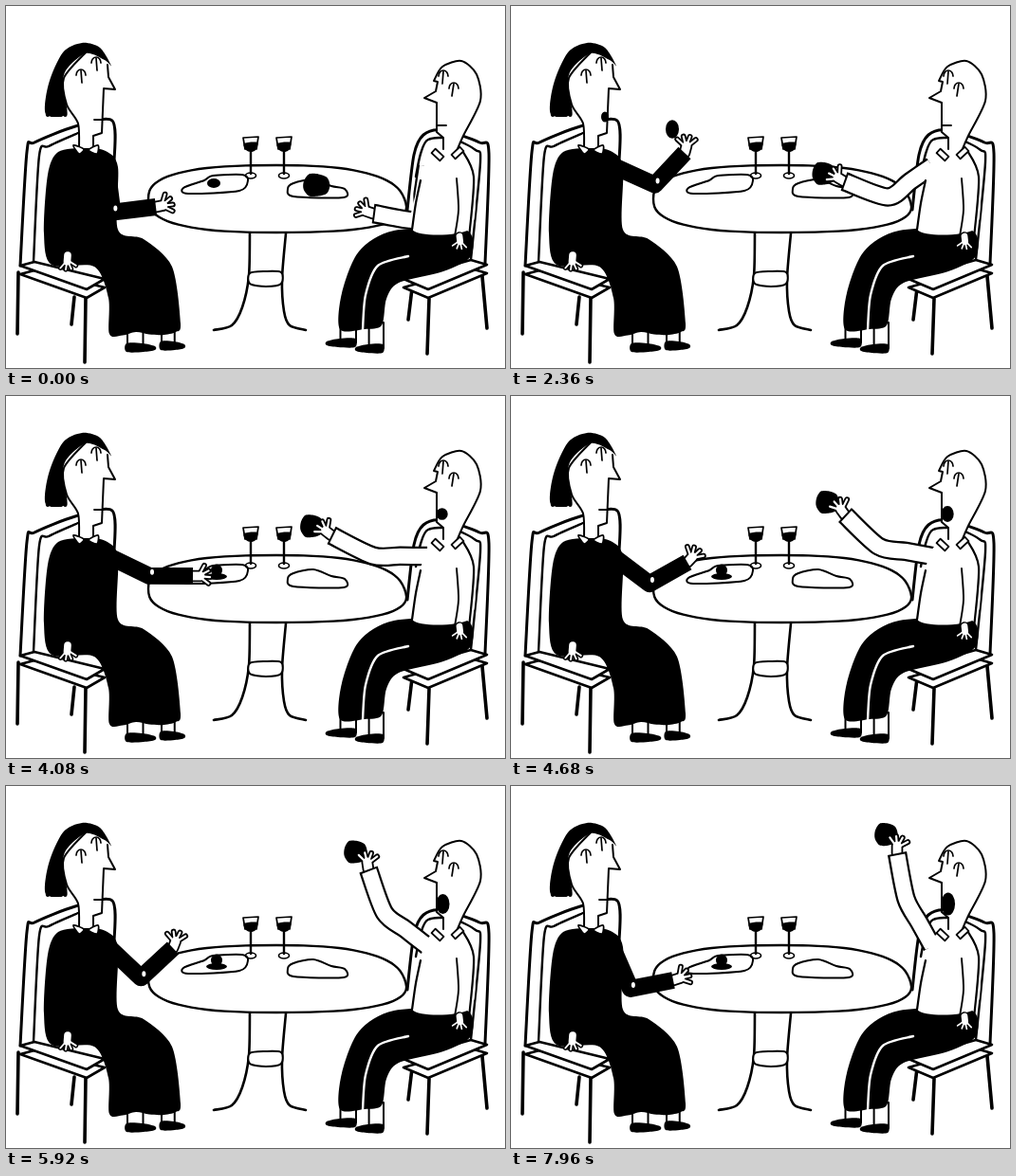
These frames come from a looping animation (526x382 px, 8000 ms). An HTML page with a canvas:

```html
<!DOCTYPE html>
<html lang="en">
<head>
<meta charset="utf-8">
<title>Dinner for two</title>
<style>
  html, body { margin: 0; width: 100%; height: 100%; overflow: hidden; background: #fff; }
  canvas { display: block; }
</style>
</head>
<body>
<canvas id="stage" width="526" height="382"></canvas>
<script>
const ctx = document.getElementById('stage').getContext('2d');
const LOOP = 8000, STEP = 40;
const INK = '#000', PAPER = '#fff';

// ---- drawing helpers ----
const range = (n, f) => Array.from({ length: n }, (_, i) => f(i));

function ink(width = 2.2, color = INK) {
  ctx.lineWidth = width;
  ctx.strokeStyle = color;
  ctx.stroke();
}

function fill(color = INK) {
  ctx.fillStyle = color;
  ctx.fill();
}

// Smooth curve through a flat list x, y, x, y, ...
function curve(p, closed) {
  const n = p.length / 2;
  const at = i => {
    const k = closed ? (i + n) % n : Math.max(0, Math.min(n - 1, i));
    return [p[2 * k], p[2 * k + 1]];
  };
  ctx.beginPath();
  ctx.moveTo(p[0], p[1]);
  for (let i = 0; i < (closed ? n : n - 1); i++) {
    const [a, b, c, d] = [at(i - 1), at(i), at(i + 1), at(i + 2)];
    ctx.bezierCurveTo(
      b[0] + (c[0] - a[0]) / 7, b[1] + (c[1] - a[1]) / 7,
      c[0] - (d[0] - b[0]) / 7, c[1] - (d[1] - b[1]) / 7, c[0], c[1]);
  }
  if (closed) ctx.closePath();
}

function corners(p) {
  for (let i = 0; i < p.length; i += 2) ctx.lineTo(p[i], p[i + 1]);
}

function edge(p, width, color) {
  ctx.beginPath();
  corners(p);
  ink(width, color);
}

const line = (p, width) => { curve(p); ink(width); };
const blob = (p, color) => { curve(p, true); fill(color); };
const shape = (p, width) => { blob(p, PAPER); ink(width); };

function oval(x, y, rx, ry, color = INK) {
  ctx.beginPath();
  ctx.ellipse(x, y, rx, ry, 0, 0, 7);
  fill(color);
}

function place(x, y, angle, paint) {
  ctx.save();
  ctx.translate(x, y);
  ctx.rotate(angle);
  paint();
  ctx.restore();
}

// ---- motion helpers ----
const mix = (a, b, u) => a + (b - a) * u;
const ramp = (t, from, to) => Math.max(0, Math.min(1, (t - from) / (to - from)));

// Linear interpolation over rows of [time, ...values]
function pose(keys, t) {
  let i = 0;
  while (i < keys.length - 2 && t >= keys[i + 1][0]) i++;
  const a = keys[i], b = keys[i + 1], u = ramp(t, a[0], b[0]);
  return a.slice(1).map((v, k) => mix(v, b[k + 1], u));
}

// Two bones from shoulder to wrist; side picks the bend of the elbow
function reach(arm, t) {
  const [x, y] = pose(arm.wrist, t);
  const [sx, sy] = arm.shoulder;
  const { upper, fore, side } = arm;
  const d = Math.min(Math.hypot(x - sx, y - sy), upper + fore);
  const bend = Math.acos(Math.min(1, (upper ** 2 + d ** 2 - fore ** 2) / (2 * upper * d)));
  const a = Math.atan2(y - sy, x - sx) + side * bend;
  const ex = sx + upper * Math.cos(a), ey = sy + upper * Math.sin(a);
  return { sx, sy, ex, ey, x, y, angle: Math.atan2(y - ey, x - ex) };
}

const her = {
  shoulder: [106, 168], upper: 50, fore: 46, side: 1,
  wrist: [[0, 158, 212], [1160, 185, 194], [2360, 183, 155], [3150, 181, 152],
    [4080, 197, 190], [5280, 175, 161], [6560, 177, 181], [7960, 171, 205]]
};
const his = {
  shoulder: [444, 169], upper: 57, fore: 49, side: -1,
  wrist: [[0, 387, 219], [1160, 365, 206], [2360, 351, 185], [4080, 343, 147],
    [5280, 361, 104], [6560, 403, 72], [7960, 407, 71]]
};
const herBite = [[560, 219, 187], [1160, 155, 187], [2360, 170, 130],
  [3150, 168, 127], [4000, 218, 184]];

// ---- parts ----
// Palm and fanned fingers, pointing along +x
function hand(x, y, angle, flip = 1, size = 1) {
  place(x, y, angle, () => {
    ctx.scale(size, size * flip);
    for (const [grow, color] of [[3.6, INK], [0, PAPER]]) {
      edge([0, 0, 8, 0], 9 + grow, color);
      [-1.05, -.5, 0, .5].forEach((a, i) =>
        edge([6, 0, 6 + 12 * Math.cos(a), 13 * Math.sin(a) + i * .5], 2.2 + grow, color));
    }
  });
}

function eye(x, y, lean) {
  ctx.beginPath();
  ctx.ellipse(x, y + 6, 5, 6, 0, Math.PI, 0);
  ink(1.7);
  edge([x, y + 1, x + lean, y + 14], 1.7);
}

// A soft back of the head joined to a sharp profile
function head(back, profile) {
  curve(back);
  corners(profile);
  fill(PAPER);
  ink(2);
}

function tab(x, y, angle) {
  place(x, y, angle, () => {
    ctx.beginPath();
    ctx.rect(-6, -3, 12, 6);
    fill(PAPER);
    ink(1.8);
  });
}

function foot(heel, toe, y, top) {
  const ankle = mix(heel, toe, .55);
  ctx.beginPath();
  ctx.rect(Math.min(heel, ankle) + 1, top, Math.abs(ankle - heel), y - 5 - top);
  fill(PAPER);
  ink(2);
  blob([heel, y - 9, ankle, y - 9, toe, y - 6, toe, y - 2, mix(heel, toe, .6), y, heel, y]);
}

function chair(back, inner, seat, legs) {
  line(back, 3);
  line(inner, 2.4);
  for (const leg of legs) edge(leg, 3.6);
  for (const drop of [9, 0]) {
    ctx.beginPath();
    corners(seat.map((v, i) => i % 2 ? v + drop : v));
    ctx.closePath();
    fill(PAPER);
    ink(2.6);
  }
}

const leftChair = () => chair(
  [15, 274, 22, 154, 30, 144, 73, 127, 112, 121, 114, 165],
  [29, 270, 35, 158, 45, 148, 76, 134],
  [15, 274, 30, 270, 104, 288, 85, 299],
  [[13, 281, 12, 346], [72, 307, 69, 336], [84, 308, 83, 376]]);

const rightChair = () => chair(
  [423, 215, 430, 157, 440, 136, 460, 131, 499, 144, 509, 155, 505, 272],
  [432, 180, 437, 156, 445, 141, 470, 140, 495, 152, 500, 165, 490, 268],
  [419, 288, 490, 268, 507, 273, 445, 299],
  [[428, 298, 424, 331], [446, 309, 444, 367], [502, 285, 507, 340]]);

function woman(t) {
  head([84, 49, 61, 76, 64, 104, 76, 124, 77, 152],
    [92, 152, 92, 137, 101, 134, 103, 87, 115, 88, 108, 75, 107, 62]);
  blob([42, 114, 45, 82, 60, 49, 80, 39, 99, 44, 111, 63, 104, 57, 84, 50,
    63, 68, 60, 88, 64, 114]);
  range(5, i => oval(44 + i * 4.6, 114, 2.2, 3));
  eye(79, 67, 1);
  eye(95, 54, 1);
  const open = ramp(t, 1500, 1900) - ramp(t, 3100, 3400);
  if (open > .1) oval(99, 117, 4 * open, 5.5 * open);
  else edge([93, 120, 102, 120], 1.8);

  foot(127, 157, 365, 340);
  foot(163, 188, 363, 340);
  const hem = range(6, i => [109 + i * 14, 346 + 2 * Math.sin(i * 2.2)]).flat();
  blob([84, 150, 55, 154, 44, 178, 40, 240, 48, 273, 93, 275, 108, 308, ...hem,
    184, 335, 175, 275, 145, 246, 118, 236, 118, 170, 105, 153]);
  shape([71, 147, 82, 151, 77, 156], 1.8);
  shape([87, 152, 97, 147, 96, 156], 1.8);
  hand(65, 263, 1.65, 1, .85);
}

function manLegs() {
  foot(368, 338, 360, 338);
  foot(397, 369, 366, 334);
  blob([352, 341, 354, 303, 372, 259, 409, 237, 484, 236, 490, 264, 461, 280,
    414, 292, 401, 309, 396, 337, 378, 341]);
  curve([376, 342, 379, 305, 392, 274, 424, 264]);
  ink(2.4, PAPER);
}

function manBody() {
  blob([447, 158, 438, 178, 428, 236, 488, 236, 494, 190, 486, 158, 468, 148], PAPER);
  line([437, 184, 432, 208, 428, 236]);
  line([480, 151, 493, 180, 488, 245]);
  line([475, 182, 477, 215, 473, 243], 1.9);
  hand(478, 243, 1.45, -1, .75);
}

function manHead(t) {
  head([475, 153, 482, 137, 500, 100, 496, 72, 480, 58, 460, 64, 451, 79],
    [455, 80, 453, 90, 441, 97, 454, 102, 454, 133, 461, 139, 461, 151]);
  edge([464, 153, 473, 153], 4, PAPER);
  eye(461, 68, -1);
  eye(472, 81, -2);
  const open = mix(.4, 1, ramp(t, 3450, 5280)) + .15 * ramp(t, 6600, 7400);
  if (t > 3450) oval(454.5 + 6 * open ** .3, 124.5, 7 * open ** .3, 10.5 * open);
  else edge([455, 126, 464, 126], 1.8);
  tab(455, 157, .75);
  tab(476, 155, -.75);
}

function glass(x) {
  ctx.beginPath();
  corners([x - 8, 139, x - 6, 151, x + 6, 151, x + 8, 138]);
  ctx.closePath();
  fill(PAPER);
  ink(1.7);
  blob([x - 7, 145, x + 7, 144, x + 5, 152, x, 154, x - 5, 152]);
  edge([x, 153, x, 177], 2.4);
  ctx.beginPath();
  ctx.ellipse(x, 179, 5.5, 3, 0, 0, 7);
  ink(1.7);
}

function table() {
  line([257, 239, 256, 285, 249, 318, 238, 337, 219, 342], 2.6);
  line([295, 240, 291, 288, 293, 322, 299, 337, 316, 342], 2.6);
  shape([257, 282, 273, 280, 290, 281, 290, 293, 274, 296, 257, 293], 2);
  // Superellipse whose right end leans outwards at the bottom
  const soft = v => Math.sign(v) * Math.abs(v) ** .77;
  shape(range(40, i => {
    const a = i * Math.PI / 20, c = soft(Math.cos(a)), y = 35.5 * soft(Math.sin(a));
    return [285 + 135 * c + .4 * y * Math.max(0, c), 203.5 + y];
  }).flat(), 2.4);
  shape([187, 192, 209, 184, 218, 179, 249, 178, 255, 184, 246, 195, 192, 198], 2);
  shape([297, 193, 303, 187, 324, 183, 343, 190, 357, 193, 356, 202, 303, 201], 2);
  glass(258);
  glass(293);
}

function herFood(t) {
  const [x, y] = pose(herBite, t);
  if (t < 4000) return oval(x, y, 7, 5 + (187 - y) / 12);
  oval(222, 184, 6, 6.5);
  oval(222, 190.5, 11, 3.5);
}

function herReach(t) {
  const { sx, sy, ex, ey, x, y, angle } = reach(her, t);
  hand(x, y, angle * 1.6);
  ctx.lineCap = 'butt';
  edge([sx, sy, ex, ey, x, y], 18);
  ctx.lineCap = 'round';
  oval(ex + 3, ey - 4, 2, 3, PAPER);
}

function hisReach(t) {
  const { sx, sy, ex, ey, x, y, angle } = reach(his, t);
  const turn = (angle + 2 * Math.PI) % (2 * Math.PI);
  const toFood = Math.PI + (turn - Math.PI) * .65 + .14;
  const lift = ramp(t, 1700, 2360);
  const fx = mix(327, x + 23 * Math.cos(toFood), lift);
  const fy = mix(189, y + 23 * Math.sin(toFood), lift);
  const lump = i => 12.5 + .8 * Math.sin(i * 2.4);
  blob(range(9, i => [
    fx + mix(1.15, 1, lift) * lump(i) * Math.cos(i * Math.PI / 4.5),
    fy + lump(i) * Math.sin(i * Math.PI / 4.5)
  ]).flat());

  hand(x, y, angle + .2, -1);
  ctx.lineCap = 'butt';
  const sleeve = (gap, width, color) => {
    curve([sx, sy, mix(sx, ex, .5), mix(sy, ey, .5), ex, ey,
      x - gap * Math.cos(angle), y - gap * Math.sin(angle)]);
    ink(width, color);
  };
  sleeve(0, 20.5);
  sleeve(2, 16, PAPER);
  ctx.lineCap = 'round';
}

function draw(t) {
  ctx.fillStyle = PAPER;
  ctx.fillRect(0, 0, 526, 382);
  ctx.lineCap = ctx.lineJoin = 'round';
  leftChair();
  woman(t);
  rightChair();
  manLegs();
  table();
  herFood(t);
  herReach(t);
  hisReach(t);
  manBody();
  manHead(t);
}

const start = performance.now();
function tick() {
  const t = (performance.now() - start) % LOOP;
  draw(Math.floor(t / STEP) * STEP);
  requestAnimationFrame(tick);
}
tick();
</script>
</body>
</html>
```
